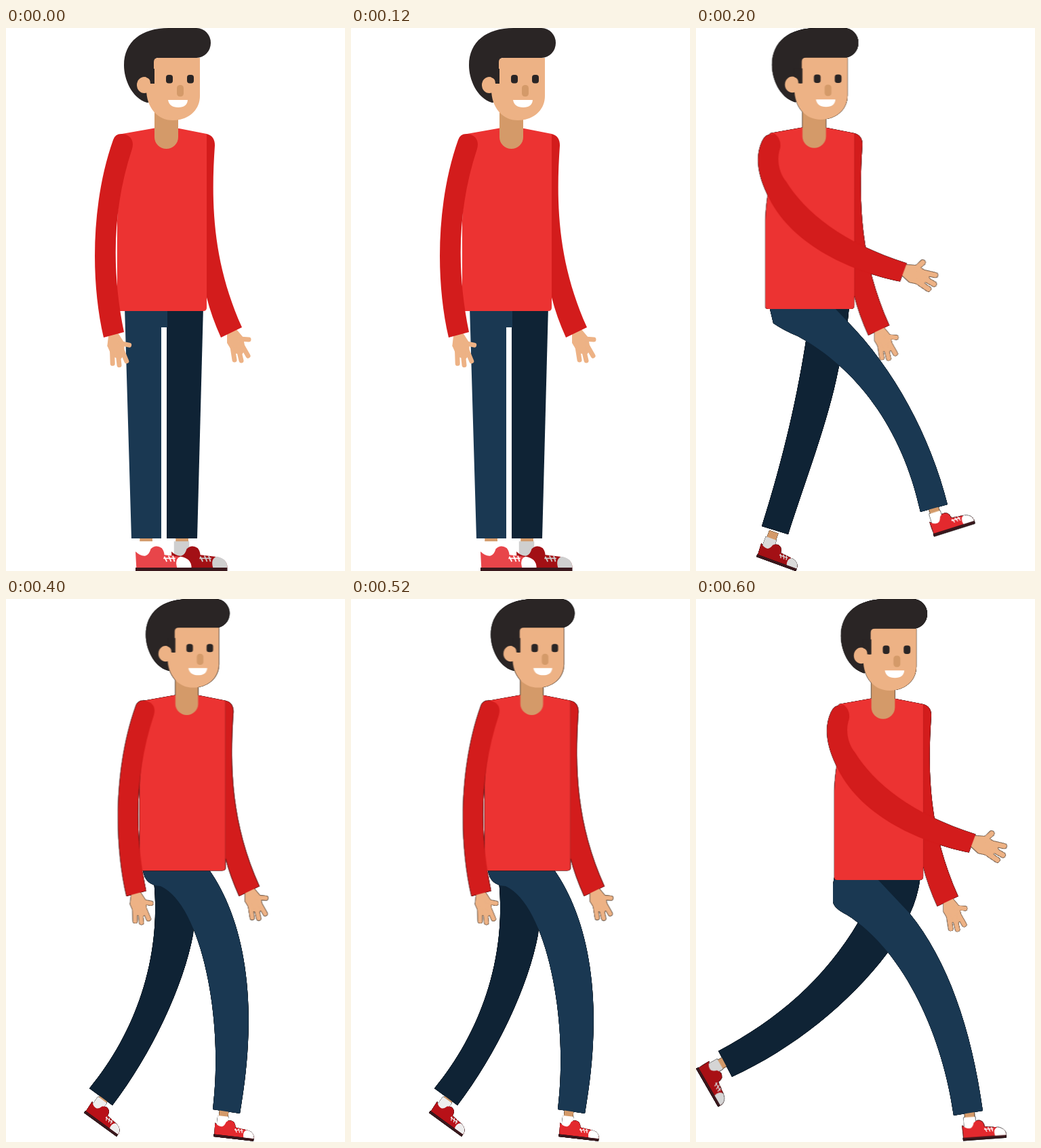
An HTML page for the animation above (800 ms loop, 500 by 800 pixels).

```html
<!DOCTYPE html>
<html lang="en">
<head>
<meta charset="utf-8">
<title>Walking man</title>
<style>
  html, body { margin: 0; width: 100%; height: 100%; overflow: hidden; background: #fff; }
  svg { display: block; width: 100%; height: 100%; }
  .edged > g { filter: drop-shadow(0 0 .5px #000) drop-shadow(0 0 .4px #000); }
</style>
</head>
<body>
<svg id="stage" viewBox="0 0 500 800"></svg>
<script>
const HOLD = 200;
const C = {
  hair: '#2a2525', skin: '#edb285', shade: '#d49a69',
  shirt: '#ec3332', sleeve: '#d31c1c',
  near: '#1a3852', far: '#0f2335', sole: '#3a181d'
};

const path = (d, fill) => `<path d="${d}" fill="${fill}"/>`;
const place = (x, y, turn, size, inner) =>
  `<g transform="translate(${x} ${y}) rotate(${turn}) scale(${size})">${inner}</g>`;

// Origin at the wrist, fingers pointing down.
const hand = (x, y, turn, size = 1) => place(x, y, turn, size,
  path('M-6 -4 L8 -6 L18 6 L21 24 L16 31 L3 29 L-6 14Z', C.skin) +
  `<path d="M2 20L5 39M11 23L15 40M17 19L25 33M12 8L26 9" fill="none"
    stroke="${C.skin}" stroke-width="7" stroke-linecap="round"/>`);

// Origin at the heel, on the ground.
const shoe = ({ at: [x, y], turn, size, color, white }) => place(x, y, turn, size,
  path('M5 -46H20V-30H5Z', C.shade) +
  path('M3 -35H21V-12H3Z', white) +
  path('M1 -4L0 -23Q6 -17 12 -18Q16 -19 18 -26Q24 -32 31 -27Q34 -23 34 -19L51 -17Q66 -15 66 -4Z', color) +
  path('M49 -4Q46 -14 53 -17Q66 -15 66 -4Z', white) +
  `<path d="M34 -17L37 -11M39 -18L42 -11M44 -18L46 -11M33 -15H47" fill="none"
    stroke="${white}" stroke-width="1.4"/>` +
  path('M0 0V-4H66V0Z', C.sole));

const leftArm = {
  hang: hand(157, 455, 7) +
    path('M158 165Q161 155 172 156C185 158 189 167 186 178C156 268 156 360 174 448L144 456C124 370 126 255 158 165Z', C.sleeve),
  swing: hand(371, 362, -47, 1.1) +
    path('M159 168Q164 156 178 157Q188 165 186 178C180 195 184 215 195 228C222 272 280 320 374 349L364 376C287 360 198 319 166 245C152 215 149 190 159 168Z', C.sleeve)
};

const rightArm = hand(332, 450, 0) +
  path('M296 156Q308 159 308 173C302 260 305 345 348 441L317 456Q303 425 296 397Z', C.sleeve);

const torso = path('M171 156L222 147H250L296 156V412Q296 417 291 417H168Q164 417 164 413V285Q165 262 168 245Z', C.shirt);

const eye = x => `<rect x="${x - 5}" y="69" width="10" height="12.5" rx="4" fill="${C.hair}"/>`;
const head =
  path('M219 120H254V161A17.5 17 0 0 1 219 161Z', C.shade) +
  path('M281 44H222V108L208 110C185 103 174 75 174 55C174 20 200 0 240 0H281A21 22 0 0 1 281 44Z', C.hair) +
  path('M218 50Q218 44 224 44H286V100C286 122 268 136 246 136C224 136 207 118 207 90V82H218Z', C.skin) +
  `<ellipse cx="204" cy="84" rx="11" ry="12" fill="${C.skin}"/>` +
  path('M207 60H219V82H213Q213 74 207 73Z', C.hair) +
  eye(241) + eye(272) +
  `<rect x="252" y="84" width="10" height="17" rx="4.5" fill="${C.shade}"/>` +
  path('M239 106H268Q267 117 254 117Q241 117 239 106Z', '#fff');

const body = (x, size, arm) =>
  place(x, 0, 0, size, rightArm + torso + head + leftArm[arm]);

const poses = [
  {
    x: 0, size: 1, arm: 'hang',
    farLeg: 'M237 410H291L282 752H237Z',
    nearLeg: 'M175 410H238V441H229V752H185Z',
    farShoe: { at: [244, 800], turn: 0, size: 1.25, color: '#a31015', white: '#cfcfcf' },
    nearShoe: { at: [191, 800], turn: 0, size: 1.25, color: '#e8454a', white: '#fff' }
  },
  {
    x: -60.5, size: .993, arm: 'swing',
    farLeg: 'M160 410H226Q222 460 210 503C195 580 160 670 136 746L97 734C130 630 150 540 163 455Z',
    nearLeg: 'M108 410L114 435Q130 446 150 454C235 500 304 588 331 713L371 702C346 602 292 502 223 432L204 412Z',
    farShoe: { at: [89, 779], turn: 20, size: .94, color: '#a31015', white: '#dadada' },
    nearShoe: { at: [351, 749], turn: -17.5, size: .96, color: '#e3292e', white: '#fff' }
  },
  {
    x: 39.5, size: .96, arm: 'hang',
    farLeg: 'M218 415L280 440L276 494C262 570 215 670 157 746L123 721C190 640 230 530 218 415Z',
    nearLeg: 'M202 398H299C350 470 375 590 345 758L305 752C322 620 288 450 228 423Q205 422 202 400Z',
    farShoe: { at: [115, 757], turn: 36, size: .9, color: '#b81118', white: '#eee' },
    nearShoe: { at: [306, 792], turn: 6.5, size: .9, color: '#e3292e', white: '#fff' }
  },
  {
    x: 41.1, size: .993, arm: 'swing',
    farLeg: 'M265 410H331Q327 440 315 465L282 522C228 594 143 663 53 704L33 666C120 620 190 560 240 475Z',
    nearLeg: 'M204 410H265L315 463C371 532 406 632 423 754L380 761C365 650 310 520 222 465Q202 455 202 445V420Z',
    farShoe: { at: [0, 692], turn: 60, size: .98, color: '#a81015', white: '#d5d5d5' },
    nearShoe: { at: [394, 798], turn: -4, size: .97, color: '#e3292e', white: '#fff' }
  }
];

const draw = (p, i) => `<g class="${i ? 'edged' : ''}">` +
  '<g>' + shoe(p.farShoe) + path(p.farLeg, C.far) +
  shoe(p.nearShoe) + path(p.nearLeg, C.near) + '</g>' +
  body(p.x, p.size, p.arm) + '</g>';

const stage = document.getElementById('stage');
stage.innerHTML = poses.map(draw).join('');
const groups = [...stage.children];

function show(time) {
  const step = Math.floor(time / HOLD) % poses.length;
  groups.forEach((g, i) => g.style.display = i === step ? '' : 'none');
}

const start = performance.now();
function tick() {
  show(performance.now() - start);
  requestAnimationFrame(tick);
}
show(0);
requestAnimationFrame(tick);
</script>
</body>
</html>
```
